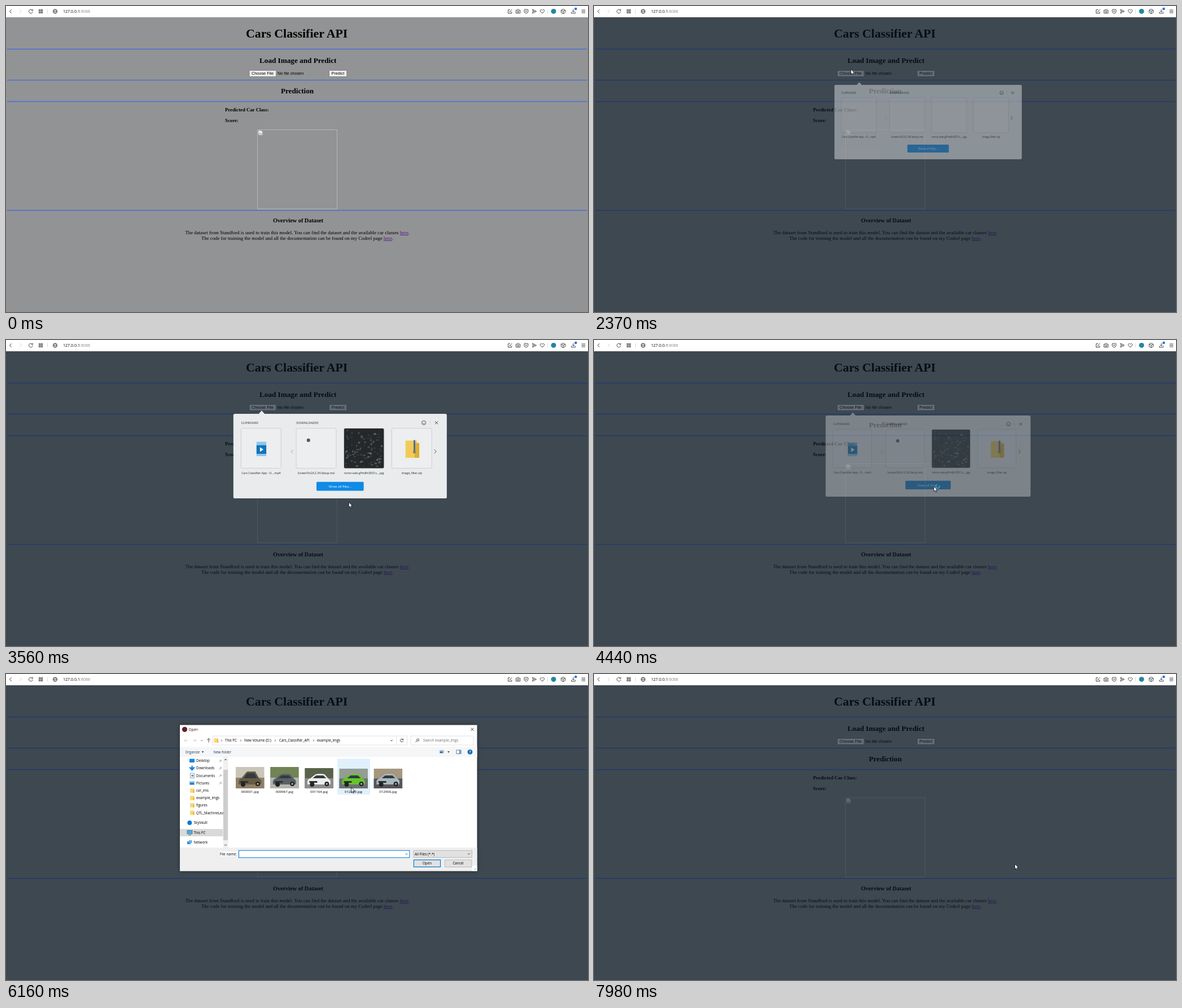
Recreate the animation shown at these times as an HTML page. Size 1031 px wide and 543 px high, loop 8 s.

```html
<!DOCTYPE html>
<html lang="en">
<head>
<meta charset="utf-8">
<title>Cars Classifier API</title>
<style>
  html, body { margin: 0; width: 100%; height: 100%; overflow: hidden; background: #929394; }
  svg { display: block; width: 1031px; height: 543px; }
  text { white-space: pre; font-family: "Open Sans", "Noto Sans", sans-serif; }
  .serif { font-family: "Liberation Serif", "Times New Roman", serif; }
  .bold { font-weight: 700; }
  .arial { font-family: "Liberation Sans", Arial, sans-serif; }
  .mid { text-anchor: middle; }
  .link { fill: #551a8b; text-decoration: underline; }
  #dialog { filter: drop-shadow(0 0 3px rgba(0, 0, 0, .4)); }
</style>
</head>
<body>
<svg id="stage" viewBox="0 0 1031 543"></svg>
<script>
const text = (x, y, size, str, cls = '', fill = '#000') =>
  `<text x="${x}" y="${y}" font-size="${size}" class="${cls}" fill="${fill}">${str}</text>`;
const rect = (x, y, w, h, fill, more = '') =>
  `<rect x="${x}" y="${y}" width="${w}" height="${h}" fill="${fill}" ${more}/>`;
const line = (d, color = '#333', width = .9, fill = 'none') =>
  `<path d="${d}" stroke="${color}" stroke-width="${width}" fill="${fill}"/>`;
const dot = (x, y, r, fill, more = '') => `<circle cx="${x}" cy="${y}" r="${r}" fill="${fill}" ${more}/>`;
const ring = (x, y, r, color = '#333') => dot(x, y, r, 'none', `stroke="${color}" stroke-width=".9"`);
const group = (id, ...parts) => `<g id="${id}">${parts.join('')}</g>`;
const border = (color, width = .8) => `stroke="${color}" stroke-width="${width}"`;
const cross = (x, y, r) => line(`M${x - r} ${y - r}l${2 * r} ${2 * r}m0 ${-2 * r}l${-2 * r} ${2 * r}`);
const down = (x, y, r = 2) => line(`M${x - r} ${y - r / 2}l${r} ${r} ${r} ${-r}`);
const right = (x, y, r = 1.5, color = '#444') => line(`M${x - r / 2} ${y - r}l${r} ${r} ${-r} ${r}`, color);
const left = (x, y, r, color = '#333') => line(`M${x + r / 2} ${y - r}l${-r} ${r} ${r} ${r}`, color, 1);

function toolbar() {
  return group('toolbar', rect(0, 0, 1031, 20, '#fff'),
    left(8, 9.5, 3.2), right(26, 9.5, 3.2, '#ccc'),
    line('M46.6 7.4A3.4 3.4 0 1 0 47.3 10M47.3 5.6V8H44.8'),
    ...[58.5, 62.3].flatMap(x => [6.4, 10.2].map(y => rect(x, y, 2.4, 2.4, 'none', border('#333')))),
    rect(73, 5.5, .7, 8, '#ccc'),
    ring(87, 9.5, 3.6), line('M83.4 9.5h7.2M87 5.9c-2.4 2-2.4 5.2 0 7.2c2.4-2 2.4-5.2 0-7.2', '#333', .7),
    text(101, 12.2, 7.1, '127.0.0.1<tspan fill="#888">:8088</tspan>'),
    line('M893 6.6h-3.4v6.4h6.2V10M892 10.6l4.4-4.6M892 10.6h1.6'),
    line('M903.4 7.4h1.8l.8-1.3h2.2l.8 1.3h1.8v5.4h-7.4z'), ring(907.1, 9.9, 1.5),
    line('M918 6.6l3.4-.8 3.4.8v3.4q-.4 2.2-3.4 3.2q-3-1-3.4-3.2z'), cross(921.4, 9.3, 1.2),
    line('M932.6 6l7 3.4-7 3.5 1.2-3.5zM933.8 9.4h3'),
    line('M950 13l-3.2-3.2c-1.8-2.6 1.6-4.8 3.2-2.2c1.6-2.6 5-.4 3.2 2.2z'),
    rect(959, 5.5, .7, 8, '#ccc'), dot(970, 9.4, 4.5, '#2386a0'),
    line('M987 5.5l3.6 1.9v4.3L987 13.6l-3.6-1.9V7.4zM983.4 7.4L987 9.4l3.6-2M987 9.4v4.2'),
    line('M1005 5.6v5M1002.8 8.6l2.2 2.2 2.2-2.2M1001.6 10.5v2.4h6.8v-2.4'), dot(1009.3, 5, 2.3, '#1a73e8'),
    line('M1019.6 7h6.6M1019.6 9.5h6.6M1019.6 12h6.6'));
}

function page() {
  const title = 'serif bold', button = (id, x, w) =>
    rect(x, 114.3, w, 11, '#efefef', `id="${id}" rx="1" ${border('#6b6b6b', .7)}`);
  const here = '<tspan class="link">here</tspan>.';
  return group('page', rect(0, 20, 1031, 523, '#929394'),
    ...[75.8, 130.9, 168.9, 362].map(y => rect(2, y, 1027.5, 1.3, '#4169e1')),
    text(425, 55.7, 21.84, 'Cars Classifier API', title),
    text(449, 100.5, 13.2, 'Load Image and Predict', title),
    button('choose', 431, 47.5), text(435, 122.3, 7.3, 'Choose File', 'arial'),
    text(481, 122.3, 7.3, 'No file chosen', 'arial'),
    button('predict', 572.5, 31.2), text(576.5, 122.3, 7.3, 'Predict', 'arial'),
    text(487, 155, 13.15, 'Prediction', title),
    text(388, 187, 8.77, 'Predicted Car Class:', title),
    text(388, 205.7, 8.77, 'Score:', title),
    rect(445.5, 219.5, 141, 140.5, 'none', border('#c0c0c0')),
    line('M447 221h5l2.5 2.5v5.5h-7.5z', '#aaa', .6, '#e8eef8'),
    line('M447.5 228.5l2.5-3 2 2 2-1.5', '#5a9a4a', 1),
    text(473, 384, 10.27, 'Overview of Dataset', title),
    text(317.5, 405, 8.77, 'The dataset from Standford is used to train this model. ' +
      'You can find the dataset and the available car classes ' + here, 'serif'),
    text(346, 414.8, 8.77, 'The code for training the model and all the documentation ' +
      'can be found on my Codrel page ' + here, 'serif'));
}

// Dark mottled picture from a small seeded generator
function mottle(x, y, size) {
  let seed = 7;
  const rnd = () => (seed = seed * 16807 % 2147483647) / 2147483647;
  let out = rect(x, y, size, size, '#24282b', 'rx="2"');
  for (let i = 0; i < 110; i++)
    out += `<ellipse cx="${x + 3 + rnd() * (size - 6)}" cy="${y + 3 + rnd() * (size - 6)}" rx="${.6 + rnd() * 2}" ` +
      `ry="${.6 + rnd() * 1.4}" fill="#7c8285" opacity="${.15 + rnd() * .45}"/>`;
  return out;
}

const cards = [
  [419, 'Cars Classifier App - O....mp4'], [515.2, 'ScreenToGif.2.34.Setup.msi'],
  [598.6, 'tomo-vale-gPm8h3DS1s....jpg'], [682, 'image_filter.zip']];

function popup() {
  return group('popup',
    line('M449.5 132.5l5.5-6 5.5 6z', 'none', 0, '#e9ebec'),
    rect(405.6, 132, 372.5, 148, '#e9ebec', 'rx="2.5"'),
    text(419, 150, 5.3, 'CLIPBOARD', 'bold', '#70757a'), text(515.5, 150, 5.3, 'DOWNLOADED', 'bold', '#70757a'),
    ring(738, 147.7, 3.6, '#555'), line('M736 148.6q2 2.4 4 0M736.5 146.3v.8M739.5 146.3v.8', '#555', .8),
    rect(748.6, 143.5, .6, 8, '#ccc'), cross(760, 147.7, 2.6),
    ...cards.map(([x, name], i) => rect(x, 157.5, 69.8, 69.8, '#eceeef', `id="card${i}" rx="2" ${border('#c6cacd')}`) +
      text(x + 35, 237.6, 5.1, name, 'mid', '#222')),
    left(508, 198, 3.5, '#bbb'), right(758, 198, 3.5),
    group('thumbs',
      rect(446, 181, 17, 25, '#8ec5ee'), rect(446, 187, 17, 15, '#1173b8'),
      line('M452 190.5v8l6-4z', 'none', 0, '#fff'),
      dot(536.6, 178.3, 3, '#55595c'), mottle(598.8, 157.8, 69.4),
      rect(706, 179, 20, 30, '#f2cb57'), rect(722, 183, 8, 26, '#dcae35'),
      rect(720, 178, 3, 18, '#4b6f9d'), rect(719.4, 196, 4.2, 5, '#807a68')),
    rect(550.6, 251, 82.4, 15.6, '#0f8ae6', 'id="showAll" rx="1.5"'),
    text(591.8, 261.1, 5.9, 'Show all files...', 'mid', '#fff'));
}

const folder = (x, y) => rect(x, y - 3.8, 7.4, 7.6, '#f8d775') + rect(x + 5.2, y - 1.5, 2.6, 5.3, '#e9bd4c');

function photo(x, y, h, back, ground, body, tall = 0) {
  const base = y + h - 7, roof = base - 18 - tall, w = 50.5;
  return rect(x, y, w, h, back) + rect(x, y + h * .5, w, h * .5, ground) +
    line(`M${x + 5} ${base}q-2-9 5-11l9-${7 + tall}q8-2 16 0l7 ${8 + tall}q5 2 3 10z`, 'none', 0, body) +
    line(`M${x + 14} ${base - 11}l6-${5 + tall}h13l5 ${5 + tall}z`, 'none', 0, '#333b40') +
    rect(x + 8, base - 6, 14, 3, '#2c2f31') + dot(x + 13, base, 4, '#222') + dot(x + 39, base - 1, 4, '#222') +
    dot(x + 39, base - 1, 1.8, '#aaa') + (tall ? rect(x + 20, roof - 1, 15, 2, body) : '');
}

const files = [
  ['000001.jpg', 165, '#c9c5b8', '#8f8068', '#665b45', 4], ['000967.jpg', 165, '#718455', '#b4b5b0', '#596068'],
  ['001164.jpg', 167, '#58634a', '#8d8e8b', '#eceeee'], ['012289.jpg', 168, '#949d93', '#6d7072', '#65c42d'],
  ['012900.jpg', 168, '#a59780', '#55565a', '#a9b9be']];

function explorer() {
  const size = 6.2, navy = '#1e395b', ui = (x, y, str, fill, cls) => text(x, y + 2.3, size, str, cls, fill);
  const nav = [['Desktop', 154], ['Downloads', 167], ['Documents', 180.3], ['Pictures', 193.5],
    ['car_ims', 207], ['example_imgs', 220], ['figures', 233], ['QTL_MachineLea', 246.3]];
  const icons = [
    rect(325, 150.5, 9, 6.5, '#1687dc'),
    line('M329.6 162.5v6M326 166.5l3.6 4 3.6-4z', '#1687dc', 2, '#1687dc'),
    rect(326.5, 176, 7, 8.6, '#f4f8fc', border('#7a93a8')) + rect(328.5, 179, 3.5, 3, '#4b93cf'),
    rect(325, 190.4, 9, 6.4, '#7fb9e6') + rect(326, 193.5, 7, 2.5, '#2b6da8')];
  const pin = y => line(`M377.6 ${y + 2.3}l2-2m-.8-1.6l2.4 2.4m-1.2-3.4l2.4 2.4`, '#777', .8);
  const crumbs = [[388, 'This PC'], [422, 'New Volume (D:)'], [484, 'Cars_Classifier_API'], [551, 'example_imgs']];
  return group('content',
    line('M322 118h-6m2.5-2.5l-2.5 2.5 2.5 2.5M331 118h6m-2.5-2.5l2.5 2.5-2.5 2.5', '#c4c4c4'), down(347, 118, 1.2),
    line('M359 121.5v-7m-2.8 2.8l2.8-2.8 2.8 2.8', '#444', 1),
    rect(366.4, 110, 344, 16, '#fff', border('#d9d9d9')), folder(368.5, 118), right(382, 118),
    ...crumbs.map(([x, s]) => ui(x, 118, s)), ...[416, 477, 545].map(x => right(x, 118)),
    down(683, 118), rect(691, 110, .7, 16, '#d9d9d9'),
    line('M703 116.2A2.6 2.6 0 1 0 703.6 118.5M703.6 114.8v2h-2'),
    rect(717, 110, 111, 16, '#fff', border('#d9d9d9')), ring(729.6, 117, 2), line('M728 118.6l-2.4 2.4'),
    ui(739, 118, 'Search example_imgs', '#6d6d6d'),
    rect(308, 129.5, 526.5, 17.5, '#f5f6f7'), ui(317.5, 138.3, 'Organize', navy), ui(367.5, 138.3, 'New folder', navy),
    ...[348.5, 784].map(x => line(`M${x - 2} 137.3h4l-2 2.4z`, 'none', 0, '#333')),
    rect(768, 135.3, 7.5, 5.5, '#8db4d6'), rect(769, 138, 4, 2, '#335f86'),
    rect(798, 135, 8, 6.4, '#fff', border('#44627d')), rect(802.5, 135, 3.5, 6.4, '#6fa3cf'),
    dot(822, 138.3, 4.4, '#0f68b5'), text(822, 140.8, 6.5, '?', 'mid bold', '#fff'),
    rect(308, 275, 76.5, 13, '#d9d9d9'),
    ...nav.map(([s, y], i) => (icons[i] ? icons[i] + pin(y) : folder(326, y)) + ui(337, y, s)),
    rect(384.6, 147, 9, 161, '#f0f0f0'), rect(385, 170, 8, 125, '#cdcdcd'),
    line('M387 153l2-2 2 2M387 302.5l2 2 2-2', '#333', 1),
    dot(325.3, 264, 4, '#0f78d4'), ui(332.5, 264, 'SkyVault'),
    rect(321, 277.5, 9, 6, '#4fa9e4', border('#477')), rect(323, 285, 5, 1, '#567'), ui(332.5, 281.5, 'This PC'),
    rect(321, 297, 6, 5, '#3b8fd0'), rect(324, 295, 5.5, 5, '#62b3e8'), ui(332.5, 299, 'Network'),
    ui(379, 319.3, 'File name:'), rect(412.4, 313.2, 302.4, 12.6, '#fff', border('#0078d7', 1)),
    group('fileName', ui(414.5, 319.5, files[3][0])), down(709.5, 319.5, 1.8),
    rect(721.8, 313.2, 103.6, 12.2, '#e1e1e1', border('#adadad')), ui(724, 319.3, 'All Files (*.*)'), down(820, 319.3, 1.8),
    rect(722.4, 329.8, 47.2, 12.6, '#e1e1e1', `id="openBtn" ${border('#0078d7', 1.2)}`), ui(746, 336, 'Open', '#000', 'mid'),
    rect(777.4, 329.8, 47.6, 12.6, '#e1e1e1', border('#adadad')), ui(801, 336, 'Cancel', '#000', 'mid'),
    line('M829 348l4-4M831.5 348l1.5-1.5', '#aaa'));
}

function dialog() {
  return group('dialog', rect(308, 90.5, 526.5, 259, '#fff'), rect(308, 308, 526.5, 41.5, '#efefef'),
    ...[[379, 315, 30, 8], [412, 313, 303, 13], [721.5, 313, 104, 12.5], [721.5, 329, 49, 14],
      [777, 329, 48.5, 14], [825.5, 340, 9, 9.5]].map(b => rect(...b, '#fff')),
    dot(316.5, 98.3, 4.6, '#641c25'), text(323.5, 100.8, 6.4, 'Open', '', '#3d1116'), cross(826, 98.2, 2.6),
    explorer(),
    group('files', rect(587.2, 150.6, 57.8, 63.5, '#e0f0fc', 'id="pick"'),
      ...files.map(([name, y, ...look], i) => photo(407 + 61.15 * i, y, 203 - y, ...look) +
        text(432.2 + 61.15 * i, 211.2, 6.1, name, 'mid'))));
}

const stage = document.getElementById('stage');
stage.innerHTML = page() + rect(0, 20, 1031, 523, '#071625', 'id="dim"') + toolbar() + popup() + dialog() +
  group('cursor', line('M0 0V9.3L2.1 7.4 3.5 10.6 5 10 3.6 6.9H6.6Z', '#000', .75, '#fff'),
    group('busy', line('M9.9-1.2A3.4 3.4 0 1 1 6 -3.1', '#3fa9dc', 1.5)));
const el = Object.fromEntries([...stage.querySelectorAll('[id]')].map(e => [e.id, e]));

const clamp = v => Math.max(0, Math.min(1, v));
const ramp = (t, start, length) => clamp((t - start) / length);
const show = (e, on) => e.setAttribute('visibility', on ? 'inherit' : 'hidden');
const fill = (e, color) => e.setAttribute('fill', color);
const zoom = (e, s, x, y) => e.setAttribute('transform', `translate(${x} ${y}) scale(${s}) translate(${-x} ${-y})`);

// Pointer moves: start, end, steps, x, y
const moves = [
  [110, 330, 4, 815, 424], [660, 1420, 12, 463.5, 114.5], [1680, 1820, 3, 462.5, 119.5],
  [2030, 2490, 6, 452.5, 109.5], [2580, 2830, 4, 455, 113.5], [2880, 3100, 4, 462, 185],
  [3160, 3330, 3, 625, 200], [3400, 3620, 4, 604, 304], [3690, 4160, 7, 602, 259.5],
  [5740, 6090, 6, 611.5, 201], [6200, 6400, 3, 613, 198], [6550, 7170, 10, 747, 347], [7230, 7310, 2, 745.5, 337]];

function pointer(t) {
  let x = 995, y = 526;
  for (const [start, end, n, toX, toY] of moves) {
    if (t < start) break;
    const step = Math.floor(ramp(t, start, end - start) * (n - 1) + 1e-6);
    const u = (step + 1) / n, ease = u * u * (3 - 2 * u);
    x += (toX - x) * ease;
    y += (toY - y) * ease;
  }
  return [x, y];
}

function draw(t) {
  const [x, y] = pointer(t);
  const over = (l, top, w, h) => x >= l && x <= l + w && y >= top && y <= top + h;

  el.cursor.setAttribute('transform', `translate(${x} ${y})`);
  show(el.cursor, t >= 110);
  show(el.busy, t >= 4160 && t < 5040);
  el.busy.setAttribute('transform', `rotate(${(t - 4440) * .36} 7 0)`);

  const hover = t >= 1490 && t < 2110;
  fill(el.choose, hover ? '#93efff' : '#efefef');
  el.choose.setAttribute('stroke', hover ? '#2f8fb8' : '#6b6b6b');
  el.dim.setAttribute('opacity', .6 * ramp(t, 2030, 260));

  const shown = ramp(t, 2256, 250), gone = ramp(t, 4250, 300);
  show(el.popup, t > 2256 && t < 4550);
  el.popup.setAttribute('opacity', shown * (1 - (t < 4300 ? 0 : gone)));
  zoom(el.popup, 1.015 - .23 * (1 - shown) - (t < 4300 ? 0 : .064 * gone), 592, 206);
  show(el.thumbs, t >= 2660);
  cards.forEach(([left], i) => el['card' + i].setAttribute('stroke', over(left, 157, 70, 70) ? '#8aa0b2' : '#c6cacd'));
  fill(el.showAll, over(551, 251, 82, 16) ? '#0c7bd0' : '#0f8ae6');

  const opened = ramp(t, 5000, 180), closed = ramp(t, 7330, 280);
  show(el.dialog, t >= 5040 && t < 7610);
  el.dialog.setAttribute('opacity', opened * (1 - (t < 7370 ? 0 : closed)));
  zoom(el.dialog, 1 - .05 * (1 - opened) - (t < 7370 ? 0 : .06 * closed), 571.3, 220);
  show(el.content, t >= 5300);
  show(el.files, t >= 5460);
  const picked = t >= 6480;
  show(el.pick, t >= 5460 && (picked || over(587, 150, 58, 64)));
  fill(el.pick, picked ? '#cce8ff' : '#e0f0fc');
  show(el.fileName, t >= 6480);
  fill(el.openBtn, over(722, 329, 48, 14) ? '#e5f1fb' : '#e1e1e1');
}

function frame() {
  draw(performance.now() % 8000);
  requestAnimationFrame(frame);
}
frame();
</script>
</body>
</html>
```
